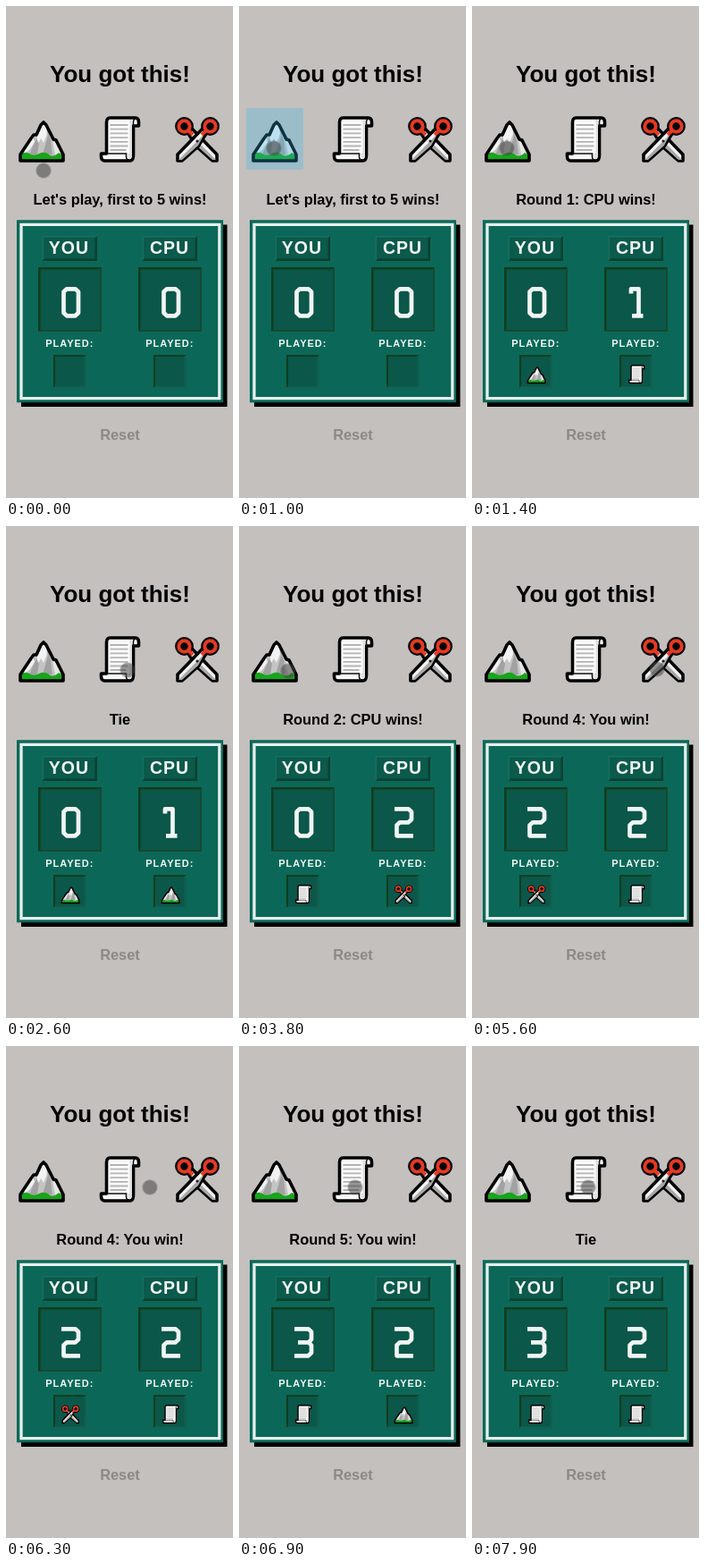
Write an HTML page that moves like this. It is 254 by 550 pixels and loops after 8000 ms.

```html
<!DOCTYPE html>
<html lang="en">
<head>
<meta charset="utf-8">
<title>Rock, paper, scissors</title>
<style>
html, body { margin: 0; width: 100%; height: 100%; overflow: hidden; background: #c3c0be; }
svg { display: block; width: 100vw; height: 100vh; }
text { font-family: "Liberation Sans", Arial, sans-serif; font-weight: 700; text-anchor: middle; }
.title { font-size: 26px; }
.line { font-size: 16.4px; }
.label { font-size: 19.5px; letter-spacing: 1px; fill: #f2f7f5; }
.played { font-size: 11px; letter-spacing: 1px; fill: #f2f7f5; }
.digit { fill: none; stroke: #f0f5f3; stroke-width: 4.7; stroke-linejoin: round; }
.ink { stroke: #000; stroke-width: 3.6; stroke-linejoin: round; }
</style>
</head>
<body>
<svg viewBox="0 0 254 550">
  <defs>
    <g id="rock">
      <path fill="#c4c4c4" d="M2 50V43L14 25L17 21H20L25 10L28 7L31 10L39 26L42 27L50 43V50Z"/>
      <path fill="#f2f2f2" d="M27 8L21 23L20 34L25 25L28 30L32 20L31 11ZM16 23L6 40L4 44L12 38L18 29Z"/>
      <path fill="#a2a2a2" d="M20 25L12 43H21L23 31ZM31 12L33 22L27 43H38L36 27Z"/>
      <path fill="#e6e6e6" d="M38 27L41 43H48L42 30Z"/>
      <path fill="#18a51c" d="M2 50V43Q7 39 12 42T23 42T34 43T45 41L50 44V50Z"/>
      <path class="ink" fill="none" d="M2 50V43L14 25L17 21H20L25 10L28 7L31 10L39 26L42 27L50 43V50Z"/>
    </g>
    <g id="paper">
      <path class="ink" fill="#fafafa" d="M15 2H43Q47 2 47 7V11H41V44Q41 50 37 50H9Q5 50 5 45V42H11V7Q11 2 15 2Z"/>
      <path fill="#dedede" d="M37 4H39.5V44Q39.5 48 37 48Q35 47 35 42H37Z"/>
      <path fill="none" stroke="#111" stroke-width="1.6" d="M41 11V7Q41 3 44 3M11 42H33V45Q33 49 36 49"/>
      <path fill="none" stroke="#b4b4b4" stroke-width="1.8" d="M15 10H35M15 14.7H35M15 19.4H35M15 24.1H35M15 28.8H35M15 33.5H35M15 38H33"/>
    </g>
    <g id="scissors">
      <g id="half">
        <path class="ink" fill="#f2f2f2" d="M15 18L20 14L48 43V50H43L25 34Z"/>
        <path fill="#a8a8a8" d="M18 20L47 49H43L25 33Z"/>
      </g>
      <use href="#half" transform="matrix(-1 0 0 1 52 0)"/>
      <g fill="#000" stroke="#000" stroke-width="8">
        <circle cx="11.5" cy="11.5" r="6.4"/><circle cx="40.5" cy="11.5" r="6.4"/>
      </g>
      <g fill="none" stroke="#e63a22" stroke-width="4">
        <circle cx="11.5" cy="11.5" r="6.2"/><circle cx="40.5" cy="11.5" r="6.2"/>
        <path d="M16 16L21 21M36 16L31 21"/>
      </g>
      <circle cx="26" cy="28" r="1.6" fill="#222"/>
    </g>
    <g id="panel">
      <path fill="#0b5a4b" d="M40.5 257h61.5v28h-61.5z"/>
      <path fill="#17705f" d="M40.5 257h61.5v1.5h-61.5zM40.5 257h1.5v28h-1.5z"/>
      <path fill="#0a4030" d="M102 257v28h-61.5l2.5-2.5h56.5v-23z"/>
      <path fill="#0b574a" d="M36 292h71v72h-71z"/>
      <path fill="#0f3d1c" d="M36 364v-72h71l-2.5 2.5h-66v67z"/>
      <path fill="#17492f" d="M107 292v72h-71l2-2h67v-68z"/>
      <path fill="#0b574a" d="M53 390h36.5v37h-36.5z"/>
      <path fill="#0f3d1c" d="M53 427v-37h36.5l-2 2h-32.5v33z"/>
      <path fill="#126050" d="M89.5 390v37h-36.5l2-2h32.5v-33z"/>
      <text class="played" x="71.3" y="381">PLAYED:</text>
    </g>
    <radialGradient id="touch">
      <stop offset="0" stop-color="#444" stop-opacity=".55"/>
      <stop offset=".8" stop-color="#444" stop-opacity=".55"/>
      <stop offset="1" stop-color="#444" stop-opacity=".1"/>
    </radialGradient>
  </defs>
  <text class="title" x="127.5" y="85">You got this!</text>
  <use href="#rock" x="14" y="123"/>
  <use href="#paper" x="101.5" y="123"/>
  <use href="#scissors" x="188" y="123"/>
  <rect id="tap" y="114" width="64" height="69" rx="2" fill="#33b5e5"/>
  <text class="line" id="status" x="127.5" y="222"></text>
  <path d="M17 244.5h230.5v203.5h-230.5z"/>
  <path fill="#0b6858" d="M12 239.3h231v204h-231z"/>
  <path fill="none" stroke="#e6efec" stroke-width="3.3" d="M17 244.3h221.8v194.4h-221.8z"/>
  <use href="#panel"/>
  <use href="#panel" x="112"/>
  <text class="label" x="70.5" y="277">YOU</text>
  <text class="label" x="183" y="277">CPU</text>
  <path class="digit" id="you"/>
  <path class="digit" id="cpu" transform="translate(112)"/>
  <use id="youPick"/>
  <use id="cpuPick"/>
  <text class="line" x="127.5" y="485" fill="#8b8886">Reset</text>
  <circle id="cursor" r="9" fill="url(#touch)"/>
</svg>
<script>
const LOOP = 8000, STEP = 100;
const $ = id => document.getElementById(id);

const digits = [
  "M68 316.3H77.5L81 319.5V343L77.5 346.3H68L64.5 343V319.5Z",
  "M66 321.5V316.3H74.5V346.3M67 346.3H79.5",
  "M62 316.3H77.5L81 319.5V328L77.5 331.3H68L64.5 334.5V346.3H83",
  "M62 316.3H77.5L81 319.5V328L78 331.3L81 334.5V343L77.5 346.3H62M66 331.3H78"
];
const buttonX = { rock: 8, paper: 95.5, scissors: 182 };

// time, message, scores, picks
const rounds = [
  [0, "Let's play, first to 5 wins!", 0, 0],
  [1100, "Round 1: CPU wins!", 0, 1, "rock", "paper"],
  [1800, "Tie", 0, 1, "rock", "rock"],
  [2900, "Round 2: CPU wins!", 0, 2, "paper", "scissors"],
  [4000, "Round 3: You win!", 1, 2, "rock", "scissors"],
  [5300, "Round 4: You win!", 2, 2, "scissors", "paper"],
  [6800, "Round 5: You win!", 3, 2, "paper", "rock"],
  [7500, "Tie", 3, 2, "paper", "paper"]
];

// time, x, y
const path = [
  [0, 42, 184], [300, 31, 175], [700, 39, 159], [2000, 39, 159],
  [2500, 135, 161], [2600, 136, 161], [3100, 136, 161],
  [3800, 55, 162], [4500, 52, 164], [4600, 52, 173], [4700, 52, 173],
  [5200, 205, 160], [5600, 207, 160], [5900, 218, 158], [6000, 218, 158],
  [6500, 130, 158], [8000, 130, 158]
];

function cursorAt(t) {
  const i = path.findIndex(p => p[0] > t);
  const [t0, x0, y0] = path[i - 1], [t1, x1, y1] = path[i];
  const u = (t - t0) / (t1 - t0), e = u * u * (3 - 2 * u);
  return [x0 + (x1 - x0) * e, y0 + (y1 - y0) * e];
}

function showPick(id, pick, x) {
  const el = $(id);
  el.setAttribute("visibility", pick ? "visible" : "hidden");
  if (!pick) return;
  el.setAttribute("href", "#" + pick);
  el.setAttribute("transform", `translate(${x} 401) scale(.41)`);
}

function draw(t) {
  const [, message, you, cpu, mine, theirs] = rounds.findLast(r => r[0] <= t);
  $("status").textContent = message;
  $("you").setAttribute("d", digits[you]);
  $("cpu").setAttribute("d", digits[cpu]);
  showPick("youPick", mine, 61.5);
  showPick("cpuPick", theirs, 173.5);

  const press = rounds.find(r => r[4] && t >= r[0] - STEP && t < r[0]);
  $("tap").setAttribute("opacity", press ? .28 : 0);
  if (press) $("tap").setAttribute("x", buttonX[press[4]]);

  const [x, y] = cursorAt(t);
  $("cursor").setAttribute("cx", x);
  $("cursor").setAttribute("cy", y);
}

const start = performance.now();
function tick() {
  const t = (performance.now() - start) % LOOP;
  draw(Math.floor(t / STEP) * STEP);
  requestAnimationFrame(tick);
}
tick();
</script>
</body>
</html>
```
